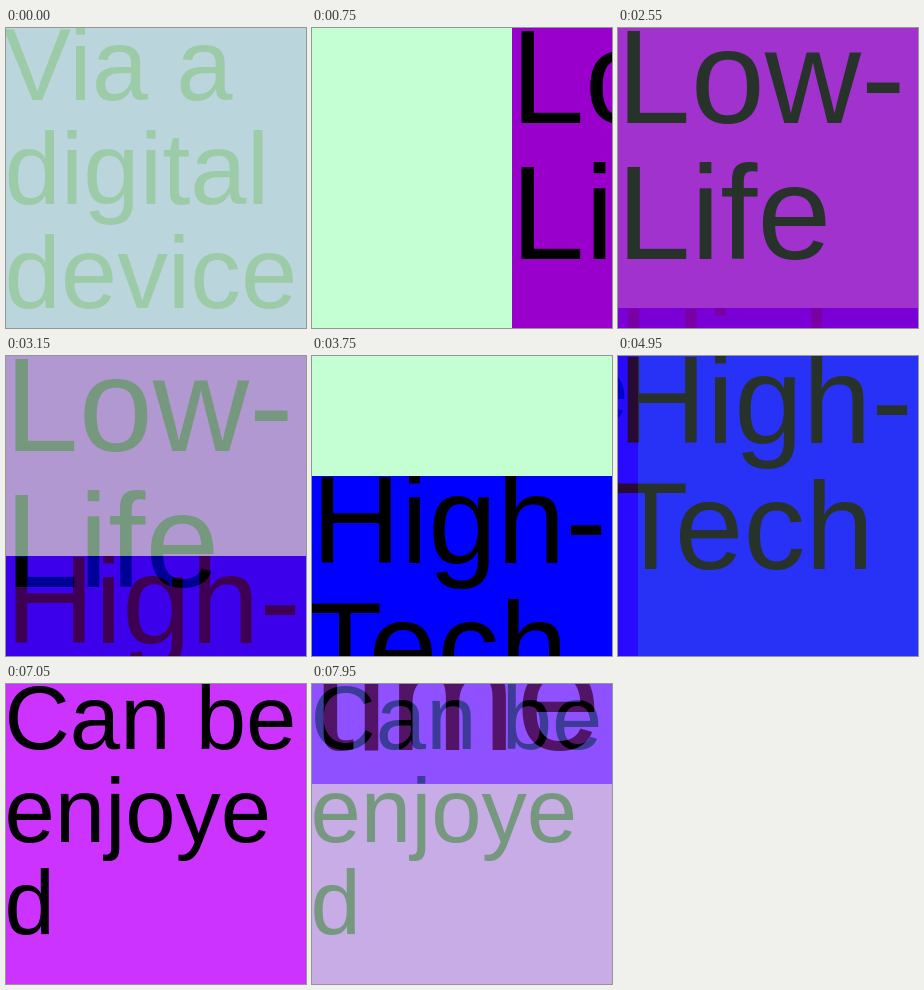
Recreate the animation shown at these times as an HTML page. Size 300 px wide and 300 px high, loop 8 s.

```html
<!DOCTYPE html>
<html lang="en">
<head>
<meta charset="utf-8">
<title>Sliding cards</title>
<style>
  html, body { margin: 0; width: 100%; height: 100%; overflow: hidden; background: #c4ffd4; }
  svg { display: block; width: 300px; height: 300px; overflow: hidden; }
  text { font-family: "Liberation Sans", Arial, sans-serif; }
</style>
</head>
<body>
<svg id="stage" viewBox="0 0 300 300"></svg>
<script>
const LOOP = 8000, STEP = 150, STEPS_PER_CARD = 16, SHIFT = 20, SIZE = 300;

// from: the side a card enters from; lines: [text, x, baseline]
const cards = [
  { color: "#9933ff", size: 101.3, from: [0, 0],
    lines: [["Via a", -2.5, 72], ["digital", -1.5, 176], ["device", -1.5, 280]] },
  { color: "#9900cc", size: 133.3, from: [1, 0], lines: [["Low-", -1.5, 95], ["Life", -1.5, 231]] },
  { color: "#0000ff", size: 123.5, from: [0, 1], lines: [["High-", -0.5, 87], ["Tech", -5, 213]] },
  { color: "#cc33ff", size: 90.5, from: [-1, 0],
    lines: [["Can be", -1.5, 65], ["enjoye", -1.5, 157.5], ["d", -1.5, 250]] },
  { color: "#6666ff", size: 153, from: [0, -1], lines: [["time", 0, 266]] }
];

const stage = document.getElementById("stage");

function add(parent, tag, attrs, text = "") {
  const node = document.createElementNS("http://www.w3.org/2000/svg", tag);
  for (const name in attrs) node.setAttribute(name, attrs[name]);
  node.textContent = text;
  return parent.appendChild(node);
}

// Earlier cards lie on top of later ones; each nested svg clips its own text.
for (const card of [...cards].reverse()) {
  card.node = add(stage, "svg", { width: SIZE, height: SIZE });
  add(card.node, "rect", { width: SIZE, height: SIZE, fill: card.color });
  for (const [text, x, y] of card.lines) add(card.node, "text", { x, y, "font-size": card.size }, text);
}

function place(card, distance, opacity) {
  const [dx, dy] = card.from;
  card.node.setAttribute("x", dx * distance);
  card.node.setAttribute("y", dy * distance);
  card.node.setAttribute("opacity", opacity);
}

function draw() {
  const step = Math.floor(performance.now() % LOOP / STEP);
  const current = Math.floor(step / STEPS_PER_CARD);
  const k = step % STEPS_PER_CARD;
  // The first card is already most of the way through its fade.
  const faded = current === 0 ? 8 + k : k && k + 1;

  cards.forEach((card, i) => {
    if (i === current) place(card, 0, Math.max(0, 10 - faded) / 10);
    else if (i === current + 1) place(card, SIZE - SHIFT * k, 1);
    else place(card, 0, 0);
  });
  requestAnimationFrame(draw);
}
draw();
</script>
</body>
</html>
```
